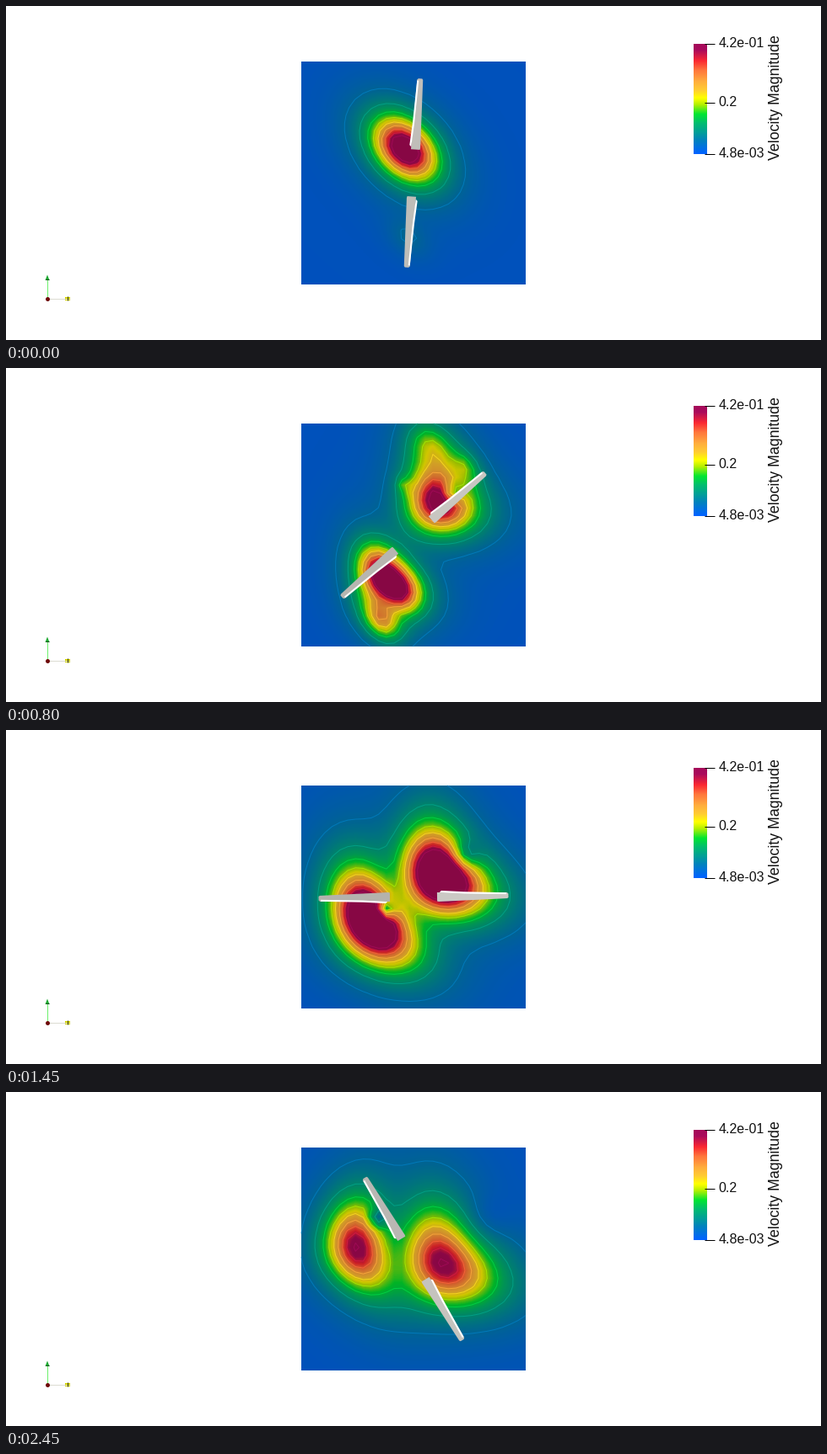
A matplotlib script for the animation above (2.5 s loop, 966 by 397 pixels).

```python
import numpy as np
import matplotlib.pyplot as plt
from matplotlib.animation import FuncAnimation
from matplotlib.colors import LinearSegmentedColormap, Normalize
from matplotlib.patches import Polygon, Rectangle

WIDTH, HEIGHT, DPI = 966, 397, 100
LEFT, RIGHT, TOP, BOTTOM = 350, 616, 66, 331
CENTER = np.array([483, 198.5])
LOW, HIGH, YELLOW = 0.0048, 0.42, 0.2
FRAMES, INTERVAL, STEP_MS = 50, 50, 84.3
SPLIT_STEP, MATURE_STEP, LAST_STEP = 6, 11, 28
PX = 72 / DPI

STOPS = [
    (0, "#0064ff"), (0.12, "#0082be"), (0.2, "#00a096"), (0.28, "#00be6e"),
    (0.36, "#00e632"), (0.45, "#b4f000"), (0.51, "#ffff00"), (0.58, "#ffcd32"),
    (0.66, "#ffaf3c"), (0.76, "#ff783c"), (0.85, "#fa2832"), (0.95, "#aa0a5c"),
    (1, "#a50a5a"),
]
bright = LinearSegmentedColormap.from_list("bright", STOPS)
shaded = LinearSegmentedColormap.from_list(
    "shaded", bright(np.linspace(0, 1, 256))[:, :3] * [0.82, 0.78, 0.76])
norm = Normalize(LOW, HIGH)
levels = np.linspace(LOW, HIGH, 10)

NODES = 30
xs = np.linspace(LEFT, RIGHT, NODES)
ys = np.linspace(TOP, BOTTOM, NODES)
X, Y = np.meshgrid(xs, ys)


def lobe(x, y, along, across, angle, peak, bend=0):
    """Bean-shaped plume; its radii reach the yellow level or half the peak."""
    c, s = np.cos(np.radians(angle)), np.sin(np.radians(angle))
    u = ((X - x) * c + (Y - y) * s) / along
    v = (Y - y) * c - (X - x) * s + 2 * bend * along * (np.hypot(1, u) - 1)
    spread = (peak / min(YELLOW, peak / 2)) ** (1 / 1.6) - 1
    return peak / (1 + spread * (u ** 2 + (v / across) ** 2)) ** 1.6


def hollow(x, y, radius, depth):
    return 1 - depth * np.exp(-((X - x) ** 2 + (Y - y) ** 2) / radius ** 2)


def combine(lobes):
    return np.sqrt(0.011 ** 2 + sum(part ** 2 for part in lobes))


def puffs(points, angle):
    """Lobes of one common shape from x, y, size, peak."""
    return combine(lobe(x, y, size, 0.68 * size, angle, peak)
                   for x, y, size, peak in points)


startup = puffs([(473, 170, 42, 0.55), (477, 275, 28, 0.055)], 45)
split = puffs([(504, 94, 30, 0.34), (543, 117, 18, 0.26), (473, 140, 9, 0.215),
               (465, 264, 30, 0.6), (445, 298, 32, 0.62), (446, 240, 21, 0.32)], 55)


def mature(age):
    """Both plumes swell, drift clockwise and fade as age goes from 0 to 1."""
    swell = np.sin(np.pi * age ** 1.35)
    peak = 0.8 - 0.37 * age ** 2
    right = lobe(513 + 5 * age, 159 + 45 * age, 51 + 9 * swell,
                 44 - 6 * age ** 2, 50, peak, 0.27)
    left = lobe(450 - 34 * np.sin(np.pi / 2 * age), 251 - 66 * age, 46 + 25 * swell,
                31 + 13 * swell, 45 + 30 * age, peak, 0.17)
    wake = np.cos(np.pi * (age / 0.65 - 0.54)) ** 2
    return (combine([right, left])
            * hollow(531 + 48 * age, 147 - 4 * age, 12 + 14 * age, 0.5)
            * hollow(456 - 15 * age, 247 - 97 * age, 11, 0.65 * wake))


def field_at(step):
    early = np.interp(step, [0, SPLIT_STEP], [1, 0])
    late = np.interp(step, [SPLIT_STEP, MATURE_STEP], [0, 1])
    age = np.clip((step - MATURE_STEP) / (LAST_STEP - MATURE_STEP), 0, 1)
    return early * startup + late * mature(age) + (1 - early - late) * split


fig = plt.figure(figsize=(WIDTH / DPI, HEIGHT / DPI), dpi=DPI, facecolor="white")
ax = fig.add_axes([0, 0, 1, 1])
ax.set_xlim(0, WIDTH)
ax.set_ylim(HEIGHT, 0)
ax.axis("off")


def line(x, y, color, width=1):
    ax.plot(x, y, color=color, lw=width * PX, zorder=5, solid_capstyle="butt")


def label(x, y, text, size, **kw):
    ax.text(x, y, text, fontsize=size * PX, family="Liberation Sans",
            color="#111111", va="center", **kw)


def draw_legend():
    ax.imshow(np.linspace(1, 0, 131)[:, None], cmap=bright, aspect="auto",
              extent=(815, 831, 176, 45))
    for y, text in ((44.5, "4.2e-01"), (114.5, "0.2"), (175.5, "4.8e-03")):
        line([828, 840], [y, y], "black")
        label(844.5, y, text, 16)
    label(912.5, 109, "Velocity Magnitude", 17.8, rotation=90, ha="center")


def draw_axes():
    line([49, 49], [347, 325], "#6cf06c")
    line([49, 75], [347.5, 347.5], "#dcdcd2")
    ax.add_patch(Polygon([(46.5, 326), (49, 319.5), (51.5, 326)], color="#1eaa32", lw=0))
    line([47, 51], [324.5, 324.5], "#14501e")
    ax.add_patch(Rectangle((70, 345.5), 6, 4, color="#d2d200", lw=0))
    line([72.5, 72.5], [345, 350], "#32320a")
    ax.plot(49, 347.5, "o", color="#6e0808", ms=5 * PX, mew=0, zorder=6)


draw_legend()
draw_axes()

half = (RIGHT - LEFT) / (NODES - 1) / 2
plane = ax.imshow(startup, cmap=shaded, norm=norm, interpolation="bilinear",
                  aspect="auto", extent=(LEFT - half, RIGHT + half, BOTTOM + half, TOP - half))
plane.set_clip_path(Rectangle((LEFT, TOP), RIGHT - LEFT, BOTTOM - TOP,
                              transform=ax.transData))

# Blade outlines as (distance from the hub, sideways offset).
BODY = [(28, -5.5), (28, 5), (111, 3.5), (112.5, 2), (112.5, -2.5), (111, -3.5), (30, -6)]
STREAK = [(31, 5), (33, 7), (60, 5.2), (110, 3.4), (110, 1.4), (60, 3)]
blades = [[ax.add_patch(Polygon([(0, 0)] * 3, lw=0, zorder=z)) for z in (7, 8)]
          for _ in range(2)]


def place(patch, shape, angle, color):
    c, s = np.cos(angle), np.sin(angle)
    radial, side = np.array([s, -c]), np.array([-c, -s])
    patch.set_xy([CENTER + u * radial + w * side for u, w in shape])
    patch.set_facecolor(color)


contours = None


def update(frame):
    global contours
    step = int(frame * INTERVAL / STEP_MS)
    field = field_at(step)
    plane.set_data(field)
    if contours is not None:
        contours.remove()
    contours = ax.contour(xs, ys, field, levels, cmap=bright, norm=norm,
                          linewidths=PX, alpha=0.8, zorder=4)
    for i, (body, streak) in enumerate(blades):
        angle = np.radians(4 + 5 * step + 180 * i)
        tone = 0.75 + 0.045 * np.sin(angle)
        place(body, BODY, angle, (tone, tone * 0.99, tone * 0.965))
        place(streak, STREAK, angle, "white")
    return []


anim = FuncAnimation(fig, update, frames=FRAMES, interval=INTERVAL,
                     init_func=lambda: [], repeat=True, repeat_delay=0)
plt.show()
```
